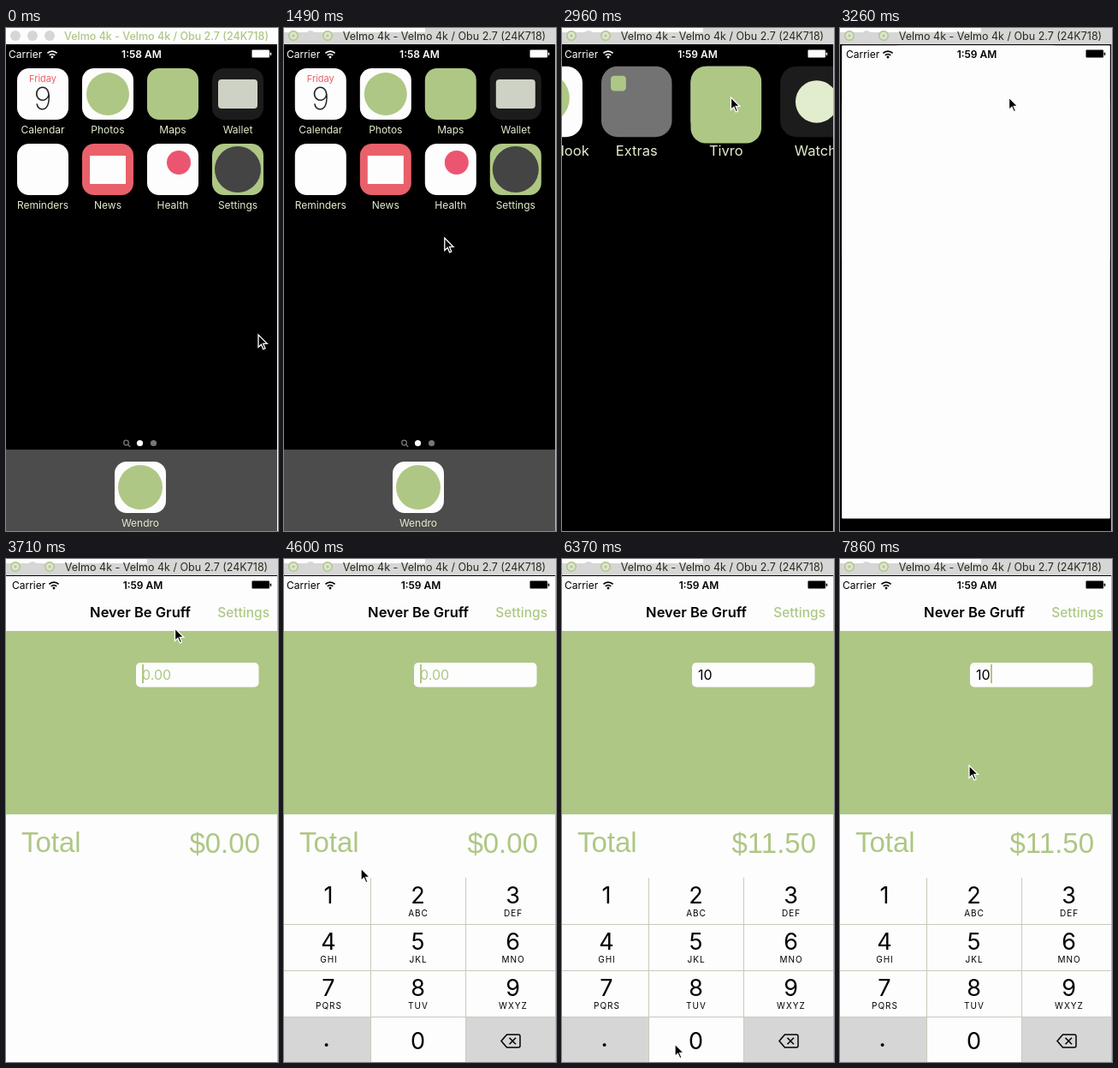
Write an HTML page that moves like this. It is 318x587 px and loops after 8 s.

```html
<!DOCTYPE html>
<html lang="en">
<head>
<meta charset="utf-8">
<title>Tip calculator demo</title>
<style>
html, body { margin: 0; width: 100%; height: 100%; overflow: hidden; background: #fff; }
svg { display: block; width: 318px; height: 587px; font-family: Inter, "Open Sans", sans-serif; }
.mid { text-anchor: middle; }
.end { text-anchor: end; }
.sum { font: 33px "Liberation Sans", Arial, sans-serif; fill: #aec785; }
</style>
</head>
<body>
<svg id="stage" viewBox="0 0 318 587"></svg>
<script>
const LOOP = 8000, GREEN = '#aec785', GREY = '#d6d6d6', WHITE = '#fdfdfd', RED = '#e9606a', DARK = '#1c1c1c', PALE = '#e2edcd';
const stage = document.getElementById('stage');

const rect = (x, y, w, h, fill, rx = 0, more = '') =>
  `<rect x="${x}" y="${y}" width="${w}" height="${h}" rx="${rx}" fill="${fill}" ${more}/>`;
const dot = (x, y, r, fill, more = '') => `<circle cx="${x}" cy="${y}" r="${r}" fill="${fill}" ${more}/>`;
const text = (s, x, y, size, fill, more = '') =>
  `<text x="${x}" y="${y}" font-size="${size}" fill="${fill}" ${more}>${s}</text>`;
const mid = (s, x, y, size, fill, weight = 400) =>
  text(s, x, y, size, fill, `class="mid" font-weight="${weight}"`);

// A home screen tile with its label; inner is drawn from the tile's corner
const tile = (name, x, y, fill, inner = '') =>
  `<g transform="translate(${x} ${y})">${rect(0, 0, 60, 60, fill, 14)}${inner}${mid(name, 30, 76, 12, PALE)}</g>`;

const pages = [
  [
    ['Calendar', WHITE, mid('Friday', 30, 16, 11, RED) + mid('9', 30, 48, 36, '#222', 200)],
    ['Photos', WHITE, dot(30, 30, 25, GREEN)],
    ['Maps', GREEN],
    ['Wallet', DARK, rect(7, 13, 46, 34, '#cdd2c4', 4)],
    ['Reminders', WHITE],
    ['News', RED, rect(9, 14, 42, 33, WHITE)],
    ['Health', WHITE, dot(37, 22, 14, '#ec5570')],
    ['Settings', GREEN, dot(30, 30, 27, '#444')]
  ],
  [
    ['Puzzle Nook', WHITE, dot(27, 27, 22, GREEN)],
    ['Extras', '#737373', rect(8, 8, 13, 13, GREEN, 3)],
    ['Tivro', WHITE, dot(30, 30, 24, GREEN)],
    ['Watch', DARK, dot(31, 30, 18, PALE)]
  ]
];

const tiles = pages.map((page, p) => page.map(([name, fill, inner], i) =>
  tile(name, 13 + 320 * p + 76 * (i % 4), 47 + 88 * (i >> 2), fill, inner)).join('')).join('');

const key = (digit, letters, i) => {
  const x = [52, 156.5, 267.5][i % 3], y = 402 + 54 * Math.floor(i / 3);
  return mid(digit, x, y, 27, '#000') + text(letters, x + .5, y + 15, 10, '#000', 'class="mid" letter-spacing="1"');
};

const keypad = rect(0, 372, 317, 215, WHITE) +
  ['', 'ABC', 'DEF', 'GHI', 'JKL', 'MNO', 'PQRS', 'TUV', 'WXYZ'].map((s, i) => key(i + 1, s, i)).join('') +
  rect(0, 535, 101, 52, GREY) + rect(213, 535, 104, 52, GREY) + rect(102, 535, 110, 52, GREY, 0, 'id="zero"') +
  mid('.', 49.5, 569, 27, '#000', 500) + mid('0', 156.5, 572, 27, '#000') +
  [427, 481, 535].map(y => rect(0, y - 1, 317, 1, '#c6ccb9')).join('') +
  [101, 212].map(x => rect(x, 372, 1, 215, '#c6ccb9')).join('') +
  `<path d="M254 562.5L260.5 555H274Q276 555 276 557V568Q276 570 274 570H260.5ZM263.5 558.8L271 566.3M271 558.8L263.5 566.3"
    fill="none" stroke="#000" stroke-width="1.5"/>`;

const lights = [11, 31, 51];

stage.innerHTML = `
  ${rect(0, 19, 317, 568, '#000')}
  <g id="home">
    <g id="pages">${tiles}</g>
    <g fill="none" stroke="#777" stroke-width="1.3"><circle cx="140.5" cy="484" r="2.8"/><path d="M142.6 486.2l2.6 2.6"/></g>
    ${dot(156.5, 484.5, 3.6, WHITE, 'id="dot0"')}${dot(172.5, 484.5, 3.6, '#777', 'id="dot1"')}
    ${rect(0, 492, 317, 95, '#4c4c4c')}
    ${tile('Wendro', 127, 506, WHITE, dot(30, 30, 26, GREEN))}
  </g>
  ${rect(0, 0, 0, 0, GREEN, 0, 'id="launch"')}
  <g id="app">
    ${rect(0, 20, 317, 567, WHITE)}
    ${mid('Never Be Gruff', 157, 68, 16.5, '#000', 600)}
    ${text('Settings', 308, 68, 15.5, GREEN, 'class="end" font-weight="500"')}
    ${rect(0, 84, 317, 214, GREEN)}${rect(152, 121, 143.5, 28.5, WHITE, 5)}
    ${text('', 159, 141, 16, '#000', 'id="amount"')}${rect(159, 123, 2, 22, GREEN, 0, 'id="caret"')}
    <text class="sum" x="18" y="342">Total</text><text class="sum end" id="total" x="297" y="343"></text>
    <g id="keypad">${keypad}</g>
  </g>
  <g id="status">
    <text id="carrier" y="35" font-size="12">Carrier</text>
    <g id="wifi" fill="none" stroke="currentColor" stroke-width="1.7">
      <path d="M-5.6-4.6a8 8 0 0 1 11.2 0M-3.2-2.2a4.6 4.6 0 0 1 6.4 0"/><circle r=".6"/></g>
    <text id="clock" class="mid" y="35" font-size="12" font-weight="600"></text>
    ${rect(287.5, 25.5, 20.5, 9, 'currentColor', 1)}${rect(308.7, 28.5, 1.5, 3.5, 'currentColor', .7)}
  </g>
  ${rect(0, 0, 318, 19, WHITE)}
  <g id="active">${rect(0, 5, 318, 14, GREY)}${rect(165, 0, 153, 6, GREY)}${rect(317, 19, 1, 568, GREEN)}</g>
  ${lights.map(x => dot(x, 9, 6, GREY)).join('')}
  <g id="rings">${[11, 51].map(x => dot(x, 9, 5.3, '#dde3d0', `stroke="${GREEN}" stroke-width="1.5"`) + dot(x, 9, 1.5, GREEN)).join('')}</g>
  ${text('Velmo 4k - Velmo 4k / Obu 2.7 (24K718)', 187.5, 14, 12.5, GREEN, 'id="title" class="mid"')}
  <path id="cursor" d="M0 0V14.5L3.4 11.3 5.8 16.8 8 15.8 5.7 10.4H10.3Z" fill="#000" stroke="#fff" stroke-width="1.3"/>`;

const el = {};
stage.querySelectorAll('[id]').forEach(e => el[e.id] = e);
const set = (name, attrs) => { for (const a in attrs) el[name].setAttribute(a, attrs[a]); };
const show = (name, on) => set(name, { visibility: on ? 'visible' : 'hidden' });

const clamp = v => Math.min(1, Math.max(0, v));
const ramp = (t, start, span) => clamp((t - start) / span);
const ease = v => v * v * (3 - 2 * v);
const mix = (a, b, p) => a + (b - a) * p;

// Pointer stops: time, x, y
const stops = [
  [0, 295, 358], [100, 295, 358], [300, 215, 259], [650, 215, 259], [1190, 188, 245], [1480, 188, 245],
  [1930, 69, 263], [2380, 69, 263], [2760, 197.5, 81], [4450, 197.5, 81], [4600, 90, 361], [4750, 69, 392],
  [5050, 69, 392], [5500, 132, 566], [7270, 132, 566], [7850, 151, 241], [LOOP, 151, 241]
];
function pointer(t) {
  const i = stops.findIndex(s => s[0] > t), [t0, x0, y0] = stops[i - 1], [t1, x1, y1] = stops[i];
  const p = ease((t - t0) / (t1 - t0));
  return [mix(x0, x1, p), mix(y0, y1, p)];
}

function draw(t) {
  const [cx, cy] = pointer(t);
  set('cursor', { transform: `translate(${cx} ${cy})` });

  // Window focus
  const active = t >= 1490;
  show('active', active);
  show('rings', active);
  set('title', { fill: active ? '#262c1a' : GREEN, 'font-weight': active ? 400 : 500 });

  // Drag the page, then let it settle
  const scroll = t < 1480 ? 0 : t < 1930 ? cx - 188 : -320 + 201 * Math.exp((1930 - t) / 100);
  set('pages', { transform: `translate(${scroll} 0)` });
  const second = t >= 2300;
  set('dot0', { fill: second ? '#777' : WHITE });
  set('dot1', { fill: second ? WHITE : '#777' });

  // The tapped tile grows to fill the screen; its height trails a little
  const p = ease(ramp(t, 2888, 400)), q = ease(ramp(t, 2902, 400));
  const scale = mix(60, 317, p) / 60, x = mix(165, 0, p), y = mix(47, 20, p);
  set('home', { transform: `translate(${x} ${y}) scale(${scale}) translate(-165 -47)` });
  const white = ramp(p, .2, .5), tone = [174, 199, 133].map(c => Math.round(mix(c, 253, white)));
  set('launch', {
    x, y, width: 60 * scale, height: mix(60, 567, q),
    rx: 14 * scale * (1 - p), fill: `rgb(${tone})`, opacity: clamp(p * 12)
  });

  const inApp = p > .5, inset = inApp && t < 3860 ? 4 : 0;
  set('status', { fill: 'currentColor', color: inApp ? '#000' : WHITE });
  set('carrier', { x: 3 + inset });
  set('wifi', { transform: `translate(${54 + inset / 2} 34)` });
  set('clock', { x: inApp ? 160 : 158.5 });
  el.clock.textContent = t < 1790 ? '1:58 AM' : '1:59 AM';

  // Calculator
  set('app', { opacity: ramp(t, 3400, 180) });
  set('keypad', { transform: `translate(0 ${215 * (1 - ease(ramp(t, 3800, 420)))})` });
  const typed = t < 4980 ? '' : t < 5780 ? '1' : '10';
  el.amount.textContent = typed || '0.00';
  set('amount', { fill: typed ? '#000' : GREEN });
  el.total.textContent = '$' + (typed * 1.15).toFixed(2);
  set('zero', { fill: t >= 5600 && t < 5780 ? GREY : WHITE });
  const caretOn = t < 6370 || (t >= 6820 && t < 7270) || t >= 7700;
  set('caret', { x: [159, 167, 176][typed.length], 'fill-opacity': caretOn ? 1 : 0 });
}

function tick() {
  draw(performance.now() % LOOP);
  requestAnimationFrame(tick);
}
tick();
</script>
</body>
</html>
```
